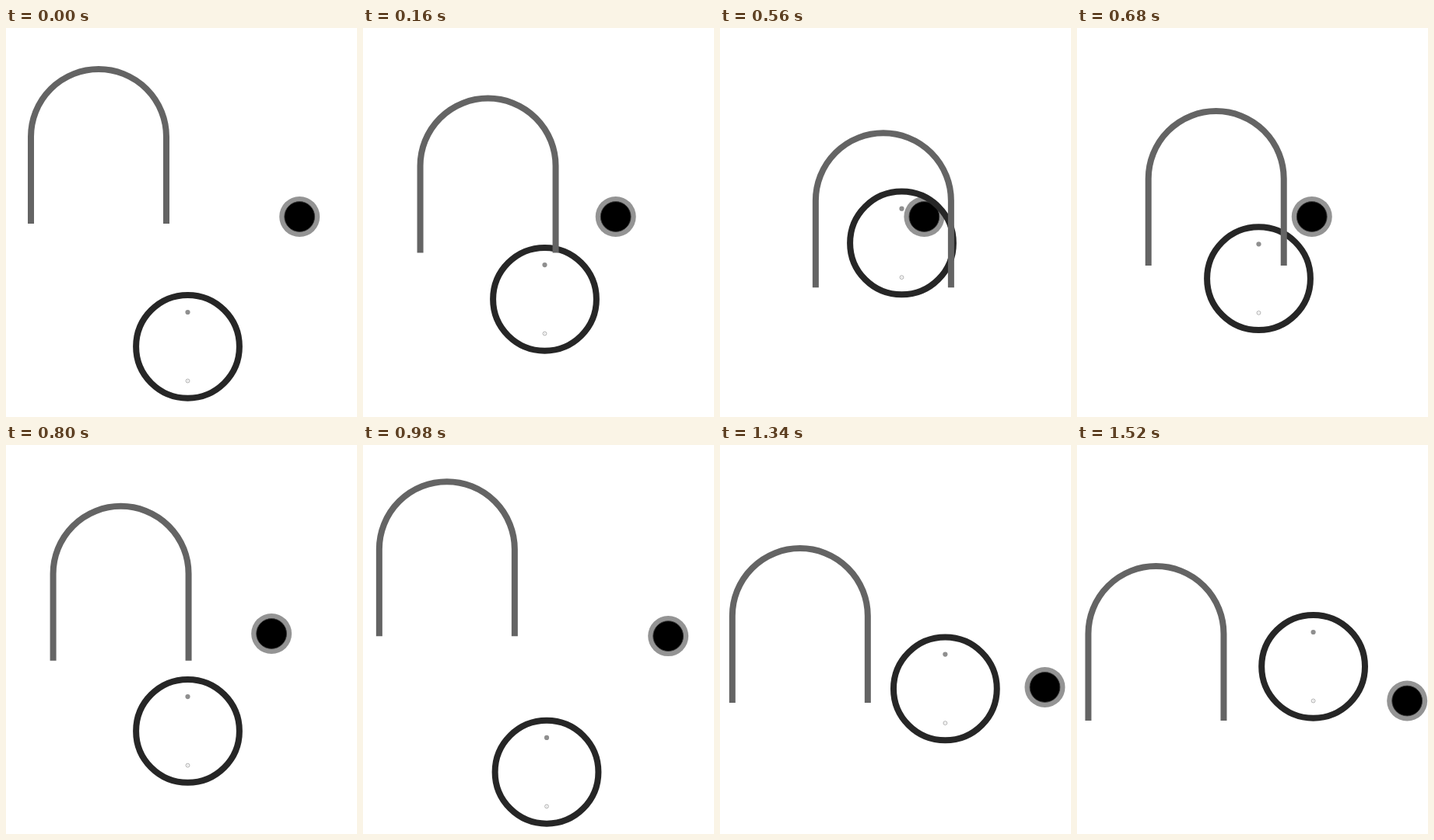
Write an HTML page that moves like this. It is 451x501 px and loops after 2.3 s.

```html
<!DOCTYPE html>
<html lang="en">
<head>
<meta charset="utf-8">
<title>Moving shapes</title>
<style>
  html, body { margin: 0; width: 100%; height: 100%; overflow: hidden; background: #fff; }
  svg { display: block; width: 451px; height: 501px; }
</style>
</head>
<body>
<svg viewBox="0 0 451 501" fill="none">
  <g id="ball">
    <circle r="26" fill="#949494"/>
    <circle r="19.4" fill="#000" stroke="#3a3a3a" stroke-width=".9"/>
  </g>
  <g id="ring">
    <circle r="66.4" stroke="#262626" stroke-width="8"/>
    <circle cy="-44.3" r="3.1" fill="#8f8f8f"/>
    <circle cy="44.2" r="2.4" stroke="#a6a6a6" stroke-width=".9"/>
    <circle cy="44.2" r=".7" fill="#c4c4c4"/>
  </g>
  <path id="arch" d="M-87 112V0A87 87 0 0 1 87 0V112" stroke="#646464" stroke-width="8"/>
</svg>
<script>
  const LOOP = 2300, STEP = 20;

  // Start position, speed on the first path (px/ms), travel of the second path
  const parts = [
    { id: 'ball', at: [377.2, 243], speed: [-0.328, 0], travel: [33.2, 86.5] },
    { id: 'ring', at: [233.5, 410.3], speed: [0, -0.381], travel: [70.1, -141] },
    { id: 'arch', at: [119, 140], speed: [0.2597, 0.235], travel: [-6.6, 112.9] }
  ];
  for (const part of parts) part.el = document.getElementById(part.id);

  // First path: out, short hold at the end, and back
  const firstPath = t => Math.max(-42, Math.min(t, 440, 910 - t));

  // Second path: out, short hold, then the beginning of the way back
  function secondPath(t) {
    const end = Math.min(t, 1520);
    return Math.max(0, Math.min(end, 1460, 2956 - end) - 963) / 473;
  }

  function draw(time) {
    const t = Math.floor((time % LOOP) / STEP) * STEP;
    const a = firstPath(t), b = secondPath(t);
    for (const { el, at, speed, travel } of parts) {
      const [x, y] = at.map((v, i) => v + speed[i] * a + travel[i] * b);
      el.setAttribute('transform', `translate(${x.toFixed(2)} ${y.toFixed(2)})`);
    }
  }

  const start = performance.now();
  function tick() {
    draw(performance.now() - start);
    requestAnimationFrame(tick);
  }
  tick();
</script>
</body>
</html>
```
